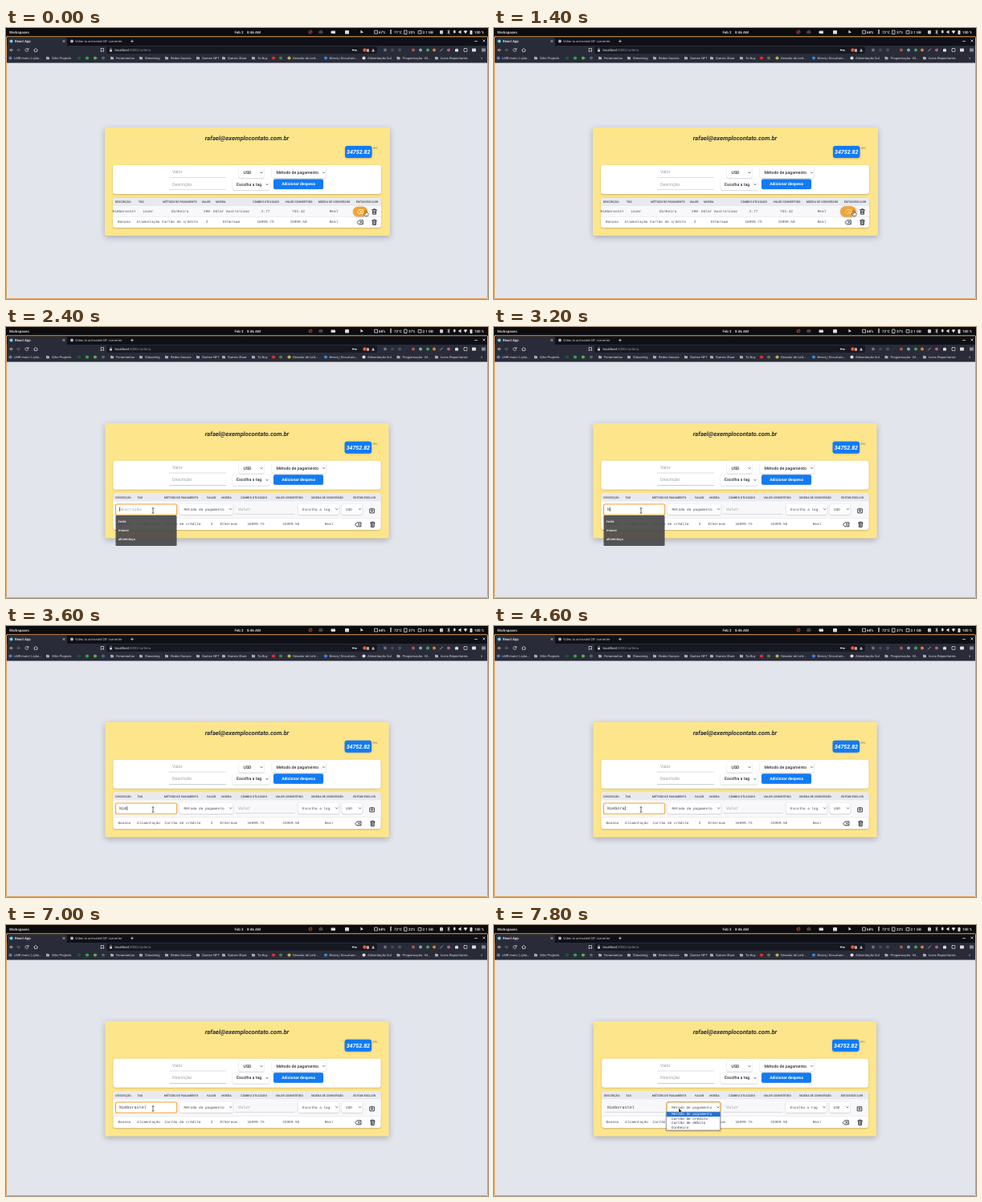
An HTML page with a canvas for the animation above (8000 ms loop, 600 by 338 pixels).

```html
<!DOCTYPE html>
<html lang="pt-BR">
<head>
<meta charset="utf-8">
<title>Carteira</title>
<style>
  html, body { margin: 0; height: 100%; overflow: hidden; background: #e2e5eb; }
  canvas { display: block; width: 600px; height: 338px; }
</style>
</head>
<body>
<canvas id="stage"></canvas>
<script>
const LOOP = 8000, STEP = 200;
const SANS = 'Roboto, sans-serif', MONO = '"Liberation Mono", monospace';
const BLUE = '#127bf3', INK = '#2d3038', ORANGE = '#f3a52f', ITEM = 'Nimborastel';

const canvas = document.getElementById('stage');
const ratio = window.devicePixelRatio || 1;
canvas.width = 600 * ratio;
canvas.height = 338 * ratio;
const c = canvas.getContext('2d');
c.scale(ratio, ratio);
c.textRendering = 'geometricPrecision';
c.textBaseline = 'middle';
c.lineCap = c.lineJoin = 'round';

function text(str, x, y, size, color = INK, { weight = 400, align = 'left', family = SANS } = {}) {
  c.font = `${weight} ${size}px ${family}`;
  c.textAlign = align;
  c.fillStyle = color;
  c.fillText(str, x, y);
}
const mono = (str, x, y, size = 4.4, color = '#4a4d55', align = 'left') =>
  text(str, x, y, size, color, { family: MONO, align });

// Boxes are given by their edges: left, top, right, bottom.
function box(x1, y1, x2, y2, color, { radius = 0, stroke, width = 1, shadow = 0 } = {}) {
  c.save();
  c.beginPath();
  c.roundRect(x1, y1, x2 - x1, y2 - y1, radius);
  if (shadow) {
    c.shadowColor = 'rgba(40, 40, 60, .3)';
    c.shadowBlur = shadow * ratio;
    c.shadowOffsetY = shadow * ratio / 3;
  }
  if (color) { c.fillStyle = color; c.fill(); }
  if (stroke) { c.strokeStyle = stroke; c.lineWidth = width; c.stroke(); }
  c.restore();
}

function icon(path, x, y, stroke, fill, width = .7) {
  const shape = new Path2D(path);
  c.save();
  c.translate(x, y);
  if (fill) { c.fillStyle = fill; c.fill(shape); }
  if (stroke) { c.strokeStyle = stroke; c.lineWidth = width; c.stroke(shape); }
  c.restore();
}

const dot = (x, y, r, color) => box(x - r, y - r, x + r, y + r, color, { radius: r });
const rule = (x1, x2, y, color = '#b9bcc4') => box(x1, y - .3, x2, y + .3, color);

const ICONS = {
  erase: 'M-3.6 0L-1.4-2.5H3.3V2.5H-1.4ZM-.2-1L1.8 1M1.8-1L-.2 1',
  trash: 'M-2.8-2.2H2.8M-1-2.4V-3.2H1V-2.4M-2.2-2.2L-1.9 3.2H1.9L2.2-2.2M-.7-.8V2M.7-.8V2',
  save: 'M-1-2.5H-2.8V2.6H2.8V-2.5H1M0-3.2V.8M-1.3-.4L0 .9L1.3-.4',
  chevron: 'M-1.1-.6L0 .6L1.1-.6',
  arrow: 'M0-2.5V3.2L1.4 2L2.4 4.2L3.3 3.8L2.3 1.7H4Z',
  hand: 'M-.8-3.2Q0-4 .5-3V-.8L2.6-.3Q3.3 0 3.1 1L2.5 3.6H-1L-2.6 1Q-2.6 0-.8 1Z',
  beam: 'M-1-3H1M0-3V3M-1 3H1',
  folder: 'M-2-1.8H-.5L0-1.2H2V1.8H-2Z',
};

function drawTopBar(t) {
  const [cpu, temp, load] = t < 800 ? [67, 71, 20] : t < 5800 ? [68, 72, 37] : [68, 72, 22];
  box(0, 0, 600, 11, '#0c0c0e');
  const label = (str, x) => text(str, x, 5.3, 4.5, '#eee', { weight: 500 });
  label('Workspaces', 4);
  label('Feb 2', 284.5);
  label('8:46 AM', 300);
  label(cpu + '%', 464);
  label(temp + '°C', 483);
  label(load + '%', 501);
  label('2.1 GB', 518.5);
  label('100 %', 583);
  icon('M-2 0A2 2 0 1 0 2 0A2 2 0 1 0-2 0M-1.3 1.3L1.3-1.3', 379, 5, '#d9543f');
  icon('M-2-1L0-2L2-1V1.5H-2Z', 392, 5, '#555', '#444');
  box(404.5, 3.5, 410, 7, '#ddd', { radius: 1 });
  box(422, 3, 427, 7.5, '#ddd', { radius: .7 });
  icon('M-1.5-2.5V2L-.2 .8H2Z', 443, 5, null, '#eee');
  box(459, 3.2, 462.5, 7, null, { stroke: '#ddd', width: .8 });
  icon('M0-2.5V2', 479, 5, '#ddd', null, 1.3);
  box(496, 3, 499, 7.5, null, { stroke: '#ddd', width: .8 });
  box(513.5, 3.5, 517, 7, null, { stroke: '#ddd', width: .8 });
  box(540, 3, 544, 7.5, '#ccc', { radius: 1 });
  icon('M-1.3-1.3L1.3 1.3L0 2.5V-2.5L1.3-1.3L-1.3 1.3', 551, 5, '#ddd');
  box(557, 2.8, 559.5, 6.5, '#ddd', { radius: 1.2 });
  icon('M-2-1H-1L1-2.5V2.5L-1 1H-2Z', 565.5, 5, null, '#ddd');
  icon('M-2.3-1Q0-3 2.3-1L0 2.2Z', 572, 5, null, '#ddd');
  box(577.5, 3, 580.5, 8, '#ddd', { radius: .7 });
}

function drawBrowser() {
  box(0, 11, 600, 22, '#0f1017');
  box(2, 12, 76, 22, '#292c38', { radius: [2, 2, 0, 0] });
  dot(6.5, 16.5, 2.1, '#5fd3f3');
  text('React App', 11, 16.7, 4.3, '#f0f0f3', { weight: 500 });
  dot(82, 16.5, 2, '#a9b4bf');
  text('Video to animated GIF converter', 86, 16.7, 4.1, '#c3c5cc');
  const cross = 'M-1.1-1.1L1.1 1.1M1.1-1.1L-1.1 1.1';
  icon(cross, 72, 16.5, '#ddd');
  icon('M-1.5 0H1.5M0-1.5V1.5', 157, 16.5, '#ddd');
  icon('M-1.5 1H1.5', 585, 15.5, '#eee');
  icon(cross, 595, 16, '#eee');

  box(0, 22, 600, 43.5, '#292c38');
  box(125, 23, 462, 32, '#171922', { radius: 2 });
  icon('M1-2L-1 0L1 2M-1 0H2.5', 6, 27.5, '#ddd');
  icon('M-1-2L1 0L-1 2M1 0H-2.5', 16, 27.5, '#777');
  icon('M1.8-.8A2 2 0 1 0 1.8 .8M2-2V-.6H.5', 26, 27.5, '#ddd');
  icon('M-2.4 0L0-2.2L2.4 0M-1.7-.3V2H1.7V-.3', 37, 27.5, '#ddd');
  icon('M-1.5-2H1.5V2L0 .9L-1.5 2Z', 120, 27.5, '#ddd');
  box(129, 27, 132, 29.5, '#ccc', { radius: .5 });
  icon('M-.8 0V-1.2A.8 .8 0 0 1 .8-1.2V0', 130.5, 27, '#ccc', null, .5);
  text('localhost', 135.5, 27.8, 4.3, '#f4f4f6');
  const width = c.measureText('localhost').width;
  text(':3000/carteira', 135.5 + width, 27.8, 4.3, '#8d909b');
  icon('M-2.2 0H2.2M1 0V1.2M2 0V1', 434, 27.5, '#ddd');
  dot(432, 27.5, 1, '#ddd');
  dot(446.5, 27.5, 2.2, '#e65a2e');
  box(449, 26, 452, 30, '#c7a493', { radius: 1 });
  icon('M0-2L2 2H-2Z', 457, 27.5, null, '#b5b0cc');
  [[472, '#697080'], [481, '#3d4a5a'], [490, '#4d5160'], [507, '#a8574a'], [516, '#85a6b8'],
   [525, '#3da56a'], [533, '#dd7d35'], [551, '#b45b85']].forEach(([x, color]) => dot(x, 27.5, 2, color));
  icon('M-1.5 1.5L1.5-1.5', 542, 27.5, '#ddd');
  icon('M-2-1.2H-.5V-2H.5V-1.2H2V2H-2Z', 561, 27.5, null, '#ddd');
  box(570, 25.5, 574, 29.5, null, { stroke: '#ddd', width: .7, radius: .5 });
  box(580, 25.5, 585, 29.5, '#ddd', { radius: .7 });
  icon('M-2-1.5H2M-2 0H2M-2 1.5H2', 594.5, 27.5, '#eee');

  const mark = (str, x) => text(str, x, 38, 4.1, '#d6d8df');
  [['Orlin Projects', 57], ['Ferramentas', 137], ['Streaming', 173], ['Redes Sociais', 205],
   ['Games NFT', 244], ['Games Store', 276], ['To Buy', 313], ['Programação - M...', 493.5],
   ['Icons Repositories', 541]].forEach(([str, x]) => {
    icon(ICONS.folder, x - 5, 37.5, null, '#a9acb6');
    mark(str, x);
  });
  [['LMR mais | Lição...', 10, '#4e7fc4'], ['Gerador de Link...', 357, '#b9b14f'],
   ['Breviq | Encurtam...', 402.5, '#3b82d8'], ['Alimentação Sul', 450, '#dadada']].forEach(([str, x, color]) => {
    dot(x - 4.5, 37.5, 2.1, color);
    mark(str, x);
  });
  [[91, '#1d5634'], [101, '#2aa84a'], [111, '#58ad55'], [121, '#536175'], [333, '#e32a2d'], [342, '#55724b']]
    .forEach(([x, color]) => dot(x, 37.5, 2.1, color));
  text('»', 591, 37.5, 5, '#ddd');
}

function select(label, x1, y1, x2, y2, labelX, { family = SANS, color = INK, focus, size = 5.2 } = {}) {
  const y = (y1 + y2) / 2;
  box(x1, y1, x2, y2, '#fff', { radius: 2, shadow: 1.5, stroke: focus && ORANGE });
  text(label, labelX, y, size, color, { family, weight: family === SANS ? 500 : 400 });
  icon(ICONS.chevron, x2 - 3, y, INK);
}

function drawForm(dy, edge) {
  text('rafael@exemplocontato.com.br', 300, 138 + dy, 7.6, INK, { weight: 'italic 600', align: 'center' });
  box(422 - edge, 147 + dy, 455.5 - edge, 162 + dy, BLUE, { radius: 3, shadow: 2 });
  text('34752.82', 438.7 - edge, 155 + dy, 7, '#fff', { weight: 'italic 700', align: 'center' });
  text('BRL', 457 - edge, 150 + dy, 3.6, '#8d8464');
  box(133 + edge, 171 + dy, 467 - edge, 207 + dy, '#fff', { radius: 3, shadow: 2 });
  text('Valor', 207, 179.6 + dy, 5.4, '#9a9da6');
  rule(203, 274, 186.3 + dy);
  text('Descrição', 207, 195 + dy, 5.4, '#9a9da6');
  rule(203, 274, 201.7 + dy);
  select('USD', 290, 174 + dy, 321, 187 + dy, 295.5);
  select('Método de pagamento', 331, 174 + dy, 398.5, 187 + dy, 336.5);
  select('Escolha a tag', 282, 188.5 + dy, 328, 202 + dy, 287);
  box(333, 188.5 + dy, 395, 201 + dy, BLUE, { radius: 2, shadow: 1 });
  text('Adicionar despesa', 364, 195 + dy, 5, '#fff', { weight: 700, align: 'center' });
}

const HEADERS = ['DESCRIÇÃO', 'TAG', 'MÉTODO DE PAGAMENTO', 'VALOR', 'MOEDA', 'CÂMBIO UTILIZADO',
  'VALOR CONVERTIDO', 'MOEDA DE CONVERSÃO', 'EDITAR/EXCLUIR'];
const FIRST = [ITEM, 'Lazer', 'Dinheiro', '200', 'Dólar Australiano', '2.77', '753.32', 'Real'];
const SECOND = ['Banana', 'Alimentação', 'Cartão de crédito', '2', 'Ethereum', '16999.75', '33999.50', 'Real'];

function drawTable(x1, x2, top, bottom, split, headerXs) {
  box(x1, top, x2, bottom, '#fff', { radius: 3, shadow: 2 });
  box(x1, top, x2, top + 10, '#e9eaf0', { radius: [3, 3, 0, 0] });
  box(x1, top + 10, x2, split, '#f8f8fa');
  rule(x1, x2, split, '#dfe1e7');
  HEADERS.forEach((str, i) =>
    text(str, headerXs[i], top + 5.2, 3.6, '#565a66', { weight: 700, align: 'center' }));
}
const drawCells = (cells, xs, y) => cells.forEach((str, i) => mono(str, xs[i], y, 4.4, '#4a4d55', 'center'));

function drawList(t) {
  const xs = [147, 177, 216.5, 250, 280.5, 323, 364, 408];
  box(123, 124, 478, 259, '#fde58b', { radius: 2, shadow: 7 });
  drawForm(0, 0);
  drawTable(133, 467, 212, 249, 235.5, [145.7, 168.3, 216.5, 249, 267.3, 323.5, 364.5, 408.5, 449.5]);
  drawCells(FIRST, xs, 229);
  drawCells(SECOND, xs, 242.3);
  const pressed = t >= 1400;
  const grow = pressed ? 1 : 0;
  box(432 - grow, 222.8 - grow / 2, 450 + grow, 235 + grow / 2, pressed ? '#eda53b' : ORANGE, { radius: 6.5, shadow: 2 });
  icon(ICONS.erase, 441, 229, pressed ? '#f9d9a4' : '#fff');
  icon(ICONS.erase, 441, 242.3, INK, null, .9);
  icon(ICONS.trash, 458.5, 229, INK, null, .9);
  icon(ICONS.trash, 458.5, 242.3, INK, null, .9);
}

const TYPING = [[3200, 1], [3400, 2], [3600, 3], [4000, 5], [4200, 8], [4400, 10], [4600, 7],
  [5400, 8], [5600, 9], [5800, 10], [6000, 11]];

function drawEditor(t) {
  const fieldFocus = t >= 2200 && t < 7400;
  const e = fieldFocus ? .6 : 0;
  const xs = [147.3, 177.5, 220, 256, 277, 311, 354.7, 402];
  const value = ITEM.slice(0, TYPING.reduce((n, [at, length]) => t >= at ? length : n, 0));
  box(124 - e, 120, 476 + e, 263.5, '#fde58b', { radius: 2, shadow: 7 });
  drawForm(-4.3, 1 - e);
  drawTable(134 - e, 466 + e, 207.5, 253, 238.5,
    [146.7 - e, 167.5 - e, 218, 255.7, 274.5, 308.5, 352.6, 400, 445.5 + e]);
  drawCells(SECOND, xs, 246.3);

  const placeholder = '#9a9da6';
  if (fieldFocus) box(136.5, 221, 212.7, 234.3, '#fff', { radius: 2, stroke: ORANGE, width: 1.1 });
  else rule(138, 212, 233.7);
  mono(value || 'Descrição', 141, 227.3, 5.15, value ? '#3c3f47' : placeholder);
  const caret = t < 5000 || (t >= 5400 && t < 6400);
  if (fieldFocus && caret) {
    const x = 141.3 + value.length * 3.09;
    box(x, 224.8, x + .6, 230, '#222');
  }
  const small = { family: MONO, size: 4.4, color: '#44474f' };
  select('Método de pagamento', 215 + e, 220.7, 282 + e, 234, 221 + e, { ...small, focus: t >= 7400 });
  mono('Valor', 289, 227.3, 5.15, placeholder);
  rule(285, 359.5, 233.7);
  select('Escolha a tag', 363 + e, 220.7, 414 + e, 234, 368.5 + e, small);
  select('USD', 417.5 + e, 220.7, 443 + e, 234, 422.5 + e, { ...small, color: t < 2000 ? '#888b92' : small.color });
  icon(ICONS.save, 455 + e, 229.3, INK, null, .9);
  icon(ICONS.erase, 438 + e, 246.3, INK, null, .9);
  icon(ICONS.trash, 455.7 + e, 246.3, INK, null, .9);

  if (t >= 2400 && t < 3400) {
    box(136.5, 235, 212.5, 273, 'rgba(72, 72, 72, .92)', { radius: 1 });
    ['teste', 'mouse', 'alimentaça'].forEach((str, i) => text(str, 140, 243 + i * 11, 4.2, '#f2f2f2', { weight: 500 }));
  }
  if (t >= 7600) {
    box(214.7, 233.3, 281.7, 256, '#fff', { stroke: '#777', width: .6, shadow: 2 });
    box(214.7, 233.3, 281.7, 239, '#2370d4');
    ['Método de pagamento', 'Cartão de crédito', 'Cartão de débito', 'Dinheiro'].forEach((str, i) =>
      mono(str, 221, 236.2 + i * 5.45, 4.4, i ? INK : '#fff'));
  }
}

function drawCursor(t) {
  if (t < 1600) return icon(ICONS.hand, 448, 231, '#222', '#fff', .6);
  const ease = (from, to) => {
    const p = Math.min(1, Math.max(0, (t - from) / (to - from)));
    return p * p * (3 - 2 * p);
  };
  const x = 435 - 252 * ease(1600, 2200) + 47 * ease(7000, 7400);
  const y = 229 + 2 * ease(7000, 7400);
  if (x < 213) icon(ICONS.beam, x, y, '#333');
  else icon(ICONS.arrow, x, y, '#fff', '#111', .4);
}

function draw(now) {
  const t = Math.floor(now % LOOP / STEP) * STEP;
  box(0, 0, 600, 338, '#e2e5eb');
  drawBrowser();
  drawTopBar(t);
  box(.5, 10.8, 599.5, 337.5, null, { stroke: '#dfa05a', width: 1, radius: 1 });
  if (t < 1600) drawList(t);
  else drawEditor(t);
  drawCursor(t);
  requestAnimationFrame(draw);
}
requestAnimationFrame(draw);
</script>
</body>
</html>
```
